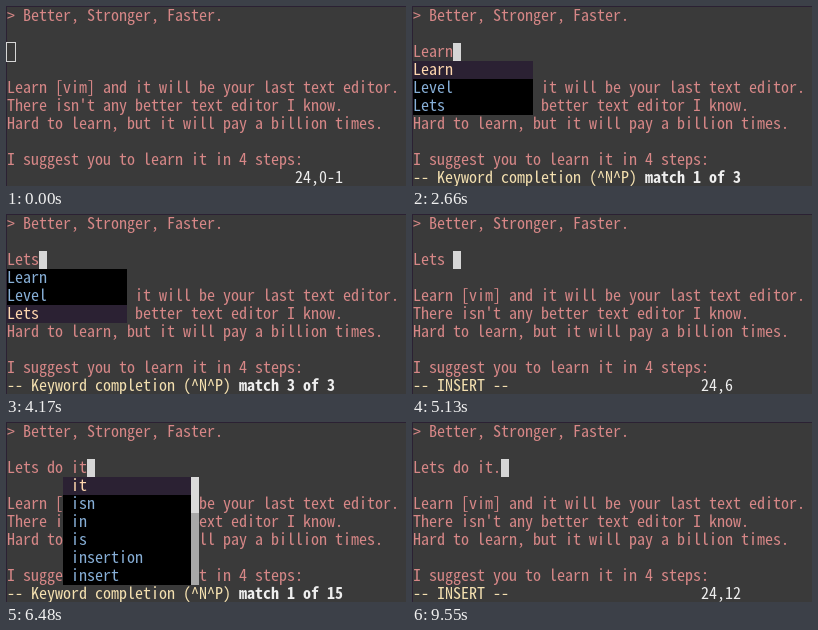
These frames come from a looping animation (400x180 px, 9830 ms). An HTML page:

```html
<!DOCTYPE html>
<html lang="en">
<head>
<meta charset="utf-8">
<title>Keyword completion</title>
<style>
  html, body { margin: 0; width: 100%; height: 100%; overflow: hidden; background: #3a3a3a; }
  svg { display: block; }
  text { white-space: pre; }
  .bold { font-weight: bold; }
</style>
</head>
<body>
<svg id="stage" width="400" height="180" viewBox="0 0 400 180"></svg>
<script>
const LOOP = 9830, CELL_W = 8, CELL_H = 18;
const FONT = '"Noto Sans Mono CJK JP", "Noto Sans Mono CJK SC", "Noto Sans Mono", monospace';
const COLOR = {
  back: '#3a3a3a', edge: '#2b2133', text: '#d78787', cursor: '#d6d6d6',
  message: '#f4e0b0', strong: '#eeeeee',
  menu: '#000000', menuText: '#87afd7', picked: '#2b2133', pickedText: '#ffd7af',
  track: '#a8a8a8', thumb: '#dadada'
};

const PAGE = [
  [0, '> Better, Stronger, Faster.'],
  [4, 'Learn [vim] and it will be your last text editor.'],
  [5, "There isn't any better text editor I know."],
  [6, 'Hard to learn, but it will pay a billion times.'],
  [8, 'I suggest you to learn it in 4 steps:']
];

const MENUS = {
  L: { col: 0, total: 3, words: ['Learn', 'Level', 'Lets'] },
  i: { col: 8, total: 15, words: ['it', 'isn', 'in', 'is', 'insertion', 'insert'] }
};

// Each step changes part of the editor state and keeps the rest.
const STEPS = [
  [0, { line: '', mode: 'normal', cursor: 'hollow', ruler: '24,0-1' }],
  [220, { cursor: 'block' }],
  [790, { cursor: 'off' }],
  [840, { mode: 'insert', cursor: 'block' }],
  [880, { ruler: '24,1' }],
  [1210, { line: 'L', ruler: '24,2' }],
  [1760, { cursor: 'off' }],
  [2140, { line: 'Le', ruler: '24,3', cursor: 'block' }],
  [2660, { line: 'Learn', mode: 'complete', menu: 'L', pick: 0, match: 1 }],
  [3210, { cursor: 'off' }],
  [3550, { line: 'Level', pick: 1, match: 2, cursor: 'block' }],
  [4110, { line: 'Lets', pick: 2 }],
  [4170, { match: 3 }],
  [4700, { cursor: 'off' }],
  [5130, { line: 'Lets ', mode: 'insert', ruler: '24,6', cursor: 'block' }],
  [5660, { cursor: 'off' }],
  [5760, { line: 'Lets d', ruler: '24,7', cursor: 'block' }],
  [5850, { line: 'Lets do', ruler: '24,8' }],
  [6010, { line: 'Lets do ', ruler: '24,9' }],
  [6170, { line: 'Lets do i', ruler: '24,10' }],
  [6480, { line: 'Lets do it', mode: 'complete', menu: 'i', pick: 0, match: 1 }],
  [7030, { cursor: 'off' }],
  [7210, { line: 'Lets do it.', mode: 'insert', ruler: '24,12', cursor: 'block' }],
  [7750, { cursor: 'off' }],
  [8350, { cursor: 'block' }],
  [8950, { cursor: 'off' }],
  [9550, { cursor: 'block' }]
];

const stage = document.getElementById('stage');

// Choose the font size whose advance fills one terminal cell.
function fitFont() {
  const pen = document.createElement('canvas').getContext('2d');
  pen.font = `100px ${FONT}`;
  stage.style.fontFamily = FONT;
  stage.style.fontSize = `${CELL_W * 100 / pen.measureText('n').width}px`;
}

const x = col => 1 + col * CELL_W;
const y = row => 1 + row * CELL_H;
const escape = s => s.replace(/&/g, '&amp;').replace(/</g, '&lt;').replace(/>/g, '&gt;');

const write = (col, row, string, fill, style = '') =>
  `<text xml:space="preserve" class="${style}" x="${x(col)}" y="${y(row) + 14}" fill="${fill}">${escape(string)}</text>`;
const block = (col, row, cols, rows, fill) =>
  `<rect x="${x(col)}" y="${y(row)}" width="${cols * CELL_W}" height="${rows * CELL_H}" fill="${fill}"/>`;

function drawMenu({ menu, pick }) {
  const { col, total, words } = MENUS[menu];
  const left = Math.max(col - 1, 0), right = col + 15, top = 3;
  let out = block(left, top, right - left, words.length, COLOR.menu);
  out += block(left, top + pick, right - left, 1, COLOR.picked);
  words.forEach((word, i) => {
    out += write(col, top + i, word, i === pick ? COLOR.pickedText : COLOR.menuText);
  });
  if (total > words.length) {
    const thumbRows = Math.floor(words.length ** 2 / total);
    out += block(right, top, 1, words.length, COLOR.track);
    out += block(right, top, 1, thumbRows, COLOR.thumb);
  }
  return out;
}

function drawStatus({ mode, ruler, menu, match }) {
  if (mode === 'complete') {
    return write(0, 9, '-- Keyword completion (^N^P)', COLOR.message) +
      write(29, 9, `match ${match} of ${MENUS[menu].total}`, COLOR.strong, 'bold');
  }
  const label = mode === 'insert' ? write(0, 9, '-- INSERT --', COLOR.message) : '';
  return label + write(36, 9, ruler, COLOR.strong);
}

function drawCursor({ line, cursor }) {
  if (cursor === 'block') return block(line.length, 2, 1, 1, COLOR.cursor);
  if (cursor === 'hollow') {
    return `<rect x="${x(0) - .5}" y="${y(2) - .5}" width="${CELL_W + 1}" height="${CELL_H + 1}" fill="none" stroke="${COLOR.cursor}"/>`;
  }
  return '';
}

function draw(state) {
  stage.innerHTML =
    `<rect width="400" height="180" fill="${COLOR.edge}"/>` +
    `<rect x="1" y="1" width="399" height="179" fill="${COLOR.back}"/>` +
    PAGE.map(([row, string]) => write(0, row, string, COLOR.text)).join('') +
    write(0, 2, state.line, COLOR.text) +
    drawCursor(state) +
    (state.mode === 'complete' ? drawMenu(state) : '') +
    drawStatus(state);
}

let shown = -1;
const start = performance.now();

function tick() {
  const time = Math.max(0, performance.now() - start) % LOOP;
  const past = STEPS.filter(([at]) => at <= time);
  if (past.length !== shown) {
    shown = past.length;
    draw(Object.assign({}, ...past.map(([, change]) => change)));
  }
  requestAnimationFrame(tick);
}

fitFont();
tick();
</script>
</body>
</html>
```
